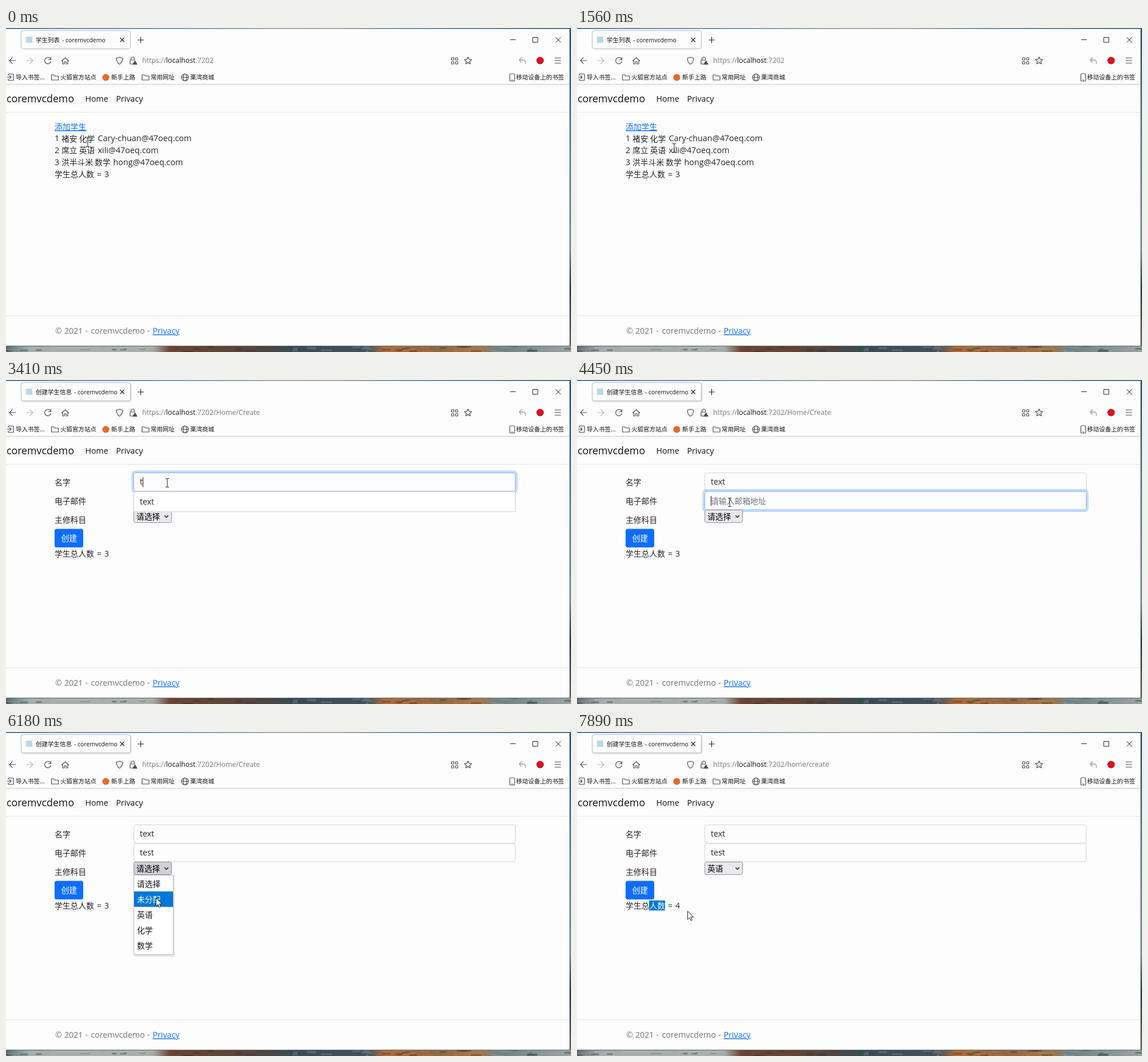
Recreate the animation shown at these times as an HTML page. Size 988 by 567 pixels, loop 8000 ms.

```html
<!DOCTYPE html>
<html lang="zh-CN">
<head>
<meta charset="utf-8">
<title>coremvcdemo</title>
<style>
  html, body { margin: 0; width: 100%; height: 100%; overflow: hidden; background: #34424f; }
  svg { display: block; width: 988px; height: 567px; }
  text { font: 14.2px "Open Sans", "Noto Sans", sans-serif; white-space: pre; }
  .cn { font: 13.8px "Noto Sans CJK SC", "Noto Sans CJK", sans-serif; }
  .small { font-size: 10.5px; }
  .url { font-size: 12.3px; }
  .nav { fill: #111; }
  .brand { font-size: 17.8px; }
  .mail { font-size: 14.4px; }
  .link { fill: #0d6efd; text-decoration: underline; }
  .link.hover { fill: #0a58ca; }
  .icon { fill: none; stroke: #4d4d55; stroke-width: 1.2; stroke-linecap: round; stroke-linejoin: round; }
  .pale { stroke: #b5b5ba; }
  .field { fill: #fdfdfd; stroke: #ced4da; }
  .field.focus { stroke: #86b7fe; }
  .ring { fill: none; stroke: #0d6efd; stroke-width: 3.5; }
  .hint { fill: #6c757d; }
</style>
</head>
<body>
<svg viewBox="0 0 988 567" fill="#212529">
  <defs>
    <linearGradient id="ground">
      <stop offset="0" stop-color="#59676c"/><stop offset=".04" stop-color="#a3b0ae"/>
      <stop offset=".26" stop-color="#a9b1aa"/><stop offset=".29" stop-color="#6b4431"/>
      <stop offset=".42" stop-color="#5a4638"/><stop offset=".5" stop-color="#3a4a55"/>
      <stop offset=".64" stop-color="#43525c"/><stop offset=".67" stop-color="#b06a35"/>
      <stop offset=".76" stop-color="#8f6542"/><stop offset=".84" stop-color="#a8774a"/>
      <stop offset=".87" stop-color="#6f7f82"/><stop offset="1" stop-color="#98a4a2"/>
    </linearGradient>
    <linearGradient id="sky">
      <stop offset="0" stop-color="#1d4f7c"/><stop offset=".3" stop-color="#4f7f9c"/>
      <stop offset=".55" stop-color="#8a9490"/><stop offset=".75" stop-color="#386a8c"/>
      <stop offset="1" stop-color="#1c4468"/>
    </linearGradient>
    <linearGradient id="side" x2="0" y2="1">
      <stop offset="0" stop-color="#1f4d75"/><stop offset=".35" stop-color="#55809c"/>
      <stop offset=".7" stop-color="#7c8c92"/><stop offset=".82" stop-color="#22303a"/>
      <stop offset="1" stop-color="#6c675e"/>
    </linearGradient>
    <linearGradient id="glow">
      <stop offset=".85" stop-color="#cbe6ff"/><stop offset="1" stop-color="#e2f1ff"/>
    </linearGradient>
    <clipPath id="selClip"><path id="selShape"/></clipPath>
    <path id="folder" d="M-6-4.5h4l1.5 2h6.5v7h-12z"/>
  </defs>

  <rect y="555" width="988" height="12" fill="url(#ground)"/>
  <g id="strokes"></g>
  <rect width="988" height="2" fill="url(#sky)"/>
  <rect x="984" width="4" height="557" fill="url(#side)"/>
  <rect y="1.500" width="986" height="554.500" fill="#fdfdfd"/>
  <path d="M0 556.500H986" stroke="#59636b"/>
  <path d="M985.500 2V556" stroke="#8a98a3"/>

  <!-- tab strip -->
  <rect id="shadow" x="26" y="5" width="194" height="34" rx="5" fill="#00000018"/>
  <rect x="26.5" y="4.5" width="191" height="32" rx="4" fill="#fdfdfd" stroke="#b4b4ba"/>
  <rect id="burst" x="27" y="5" height="31" rx="3.5" fill="url(#glow)"/>
  <rect x="35" y="15" width="11" height="11" fill="#b9d8ec"/>
  <g fill="#15141a">
    <text id="title" class="cn small" x="52" y="25"></text>
    <text id="titleEnd" class="small" y="25">- coremvcdemo</text>
  </g>
  <g class="icon" style="stroke:#222">
    <path d="M200 17.5l6.5 6.5m0-6.5l-6.5 6.5M230.500 21h10m-5-5v10"/>
    <path d="M882 20.500h9M921.500 16.500h8.500v8.500h-8.500zM961.500 16.500l8.500 8.500m0-8.500l-8.500 8.500" stroke-width="1"/>
  </g>

  <!-- toolbar -->
  <g class="icon">
    <path d="M17 57H6m5-5l-5 5 5 5"/>
    <path class="pale" d="M36 57h11m-5-5l5 5-5 5"/>
    <path d="M78 54.500a5.500 5.500 0 1 0 .5 4M78.500 51.500v4h-4"/>
    <path d="M97.500 57.500l6-5.500 6 5.500M99 56.500v6.500h3v-4h3v4h3v-6.500"/>
    <path d="M198.500 51l5.500 2c0 5-1.500 8-5.500 10.500-4-2.500-5.500-5.500-5.500-10.500z"/>
    <path d="M218.500 56v-2a3 3 0 0 1 6 0v2M222 63h-5v-7h8"/>
    <path d="M225.500 57.500l3.500 6h-7z" fill="#4d4d55"/>
    <path d="M808 50.800l1.900 4.100 4.500.5-3.300 3 .9 4.400-4-2.200-4 2.200.9-4.400-3.300-3 4.500-.5z"/>
    <path class="pale" d="M901 52l-3.500 4 3.500 4m-3.500-4h6q5 0 5 6" stroke-width="2"/>
    <path d="M960 52.500h10m-10 4.500h10m-10 4.500h10"/>
    <path d="M779 52h4v4h-4zM786 52h4v4h-4zM779 59h4v4h-4zM786 59h4v4h-4z"/>
  </g>
  <circle cx="934" cy="57" r="6.500" fill="#d9121f"/>
  <g fill="#7b7b80">
    <text class="url" x="238" y="61">https://<tspan fill="#15141a">localhost</tspan>:7202<tspan id="path"></tspan></text>
  </g>

  <!-- bookmarks -->
  <g class="icon">
    <path d="M4 83v-2.500h9v11h-9v-2.500M2 86h7m-2.500-2.500l2.500 2.500-2.500 2.500"/>
    <use href="#folder" x="85.500" y="86.500"/><use href="#folder" x="244" y="86.500"/>
    <circle cx="313" cy="86.500" r="6"/>
    <ellipse cx="313" cy="86.500" rx="2.700" ry="6"/><path d="M307 86.500h12"/>
    <rect x="881" y="80" width="8.500" height="13" rx="1.500"/><path d="M884 91h2.500"/>
  </g>
  <circle cx="174.500" cy="86.500" r="6" fill="#f0672a"/>
  <g fill="#15141a">
    <text class="cn small" x="17" y="90">导入书签...</text>
    <text class="cn small" x="95" y="90">火狐官方站点</text>
    <text class="cn small" x="184" y="90">新手上路</text>
    <text class="cn small" x="253" y="90">常用网址</text>
    <text class="cn small" x="322" y="90">栗湾商城</text>
    <text class="cn small" x="892" y="90">移动设备上的书签</text>
  </g>
  <path d="M0 98.500H985" stroke="#c9c9cd"/>

  <!-- page frame -->
  <text class="nav brand" x="1" y="130">coremvcdemo</text>
  <text class="nav" x="138.500" y="128.500">Home</text>
  <text class="nav" x="192.500" y="128.500">Privacy</text>
  <path d="M0 147.500H985M0 503.500H985" stroke="#dee2e6"/>
  <g class="hint">
    <text x="86" y="535">©</text><text x="102" y="535">2021</text><text x="138.500" y="535">-</text>
    <text x="148.500" y="535">coremvcdemo</text><text x="247" y="535">-</text>
  </g>
  <text class="link" x="256.500" y="535">Privacy</text>

  <!-- student list -->
  <g id="list">
    <text id="add" class="cn link" x="85" y="178">添加学生</text>
    <g id="rows">
      <text x="85" y="198">1</text><text class="cn" x="97" y="198.500">褚安 化学</text>
      <text class="mail" x="160.500" y="198">Cary-chuan@47oeq.com</text>
      <text x="85" y="219">2</text><text class="cn" x="97" y="219">席立 英语</text>
      <text class="mail" x="160.500" y="219">xili@47oeq.com</text>
      <text x="85" y="239.500">3</text><text class="cn" x="97" y="240">洪半斗米 数学</text>
      <text class="mail" x="187.500" y="239.500">hong@47oeq.com</text>
    </g>
  </g>
  <g id="total">
    <text class="cn" x="85" y="260.500">学生总人数</text>
    <text x="159" y="260.500">=</text><text id="count" x="172" y="260.500"></text>
  </g>

  <!-- create form -->
  <g id="form">
    <text class="cn" x="85" y="184">名字</text>
    <text class="cn" x="85" y="216.500">电子邮件</text>
    <text class="cn" x="85" y="249.500">主修科目</text>
    <g id="name"></g>
    <g id="mail"></g>
    <rect id="select" x="223.500" y="227.500" width="66" height="22" rx="3" stroke="#8f8f9d"/>
    <text id="choice" class="cn" x="228" y="244" fill="#000"></text>
    <path class="icon" d="M277.500 237.500l3 3 3-3" style="stroke:#111"/>
    <rect id="button" x="85" y="260.500" width="50" height="32.500" rx="3.500"/>
    <text class="cn" x="96.500" y="282" fill="#fff">创建</text>
    <g id="popup">
      <rect x="223.500" width="667" height="35" fill="#fff" stroke="#cfcfd8"/>
      <text id="past" x="234" y="22"></text>
    </g>
    <g id="menu"></g>
  </g>

  <use href="#selShape" fill="#0078d7"/>
  <g clip-path="url(#selClip)" fill="#fff"><use id="selText"/></g>

  <g id="status">
    <path d="M0 539.500H176q3 0 3 3V556H0z" fill="#f6f6f8" stroke="#cfcfd8"/>
    <text id="statusText" class="small" y="551" fill="#4a4a52"></text>
  </g>

  <g id="cursor">
    <path id="arrow" d="M.5.500v14.500l3.300-3.200 2.400 5.200 2.300-1-2.400-5.200h4.600z" fill="#fff" stroke="#222"/>
    <path id="beam" d="M-3-7.500h2q1 0 1 1 0-1 1-1h2M0-6.500v13M-3 7.500h2q1 0 1-1 0 1 1 1h2" fill="none" stroke="#222"/>
    <path id="hand" d="M-1.500 7V1.500a1.500 1.500 0 0 1 3 0V6l6 1.500q1.500.5 1.500 2V13l-1.500 4h-7L-5 10.500q0-2 2-1l1.500 1.500z" fill="#fff" stroke="#222"/>
  </g>
</svg>
<script>
const LOOP = 8000;
const $ = id => document.getElementById(id);
const set = (id, attrs) => { for (const k in attrs) $(id).setAttribute(k, attrs[k]); };
const show = (id, on) => { $(id).style.display = on ? '' : 'none'; };

// time, shape, x, y
const moves = [
  [0, 'beam', 143, 200], [120, 'beam', 135, 186], [260, 'hand', 112, 176], [380, 'hand', 92, 179],
  [530, 'beam', 140, 193], [650, 'beam', 160, 214], [770, 'beam', 190, 234], [890, 'arrow', 252, 247],
  [1010, 'arrow', 256, 260], [1130, 'arrow', 257, 268], [1440, 'arrow', 230, 250], [1560, 'beam', 170, 210],
  [1680, 'hand', 122, 174], [1950, 'arrow', 190, 215], [2100, 'arrow', 343, 311], [2220, 'arrow', 355, 302],
  [2340, 'arrow', 343, 266], [2460, 'arrow', 322, 232], [2610, 'beam', 296, 202], [2760, 'beam', 284, 186],
  [2880, 'beam', 282, 180], [3800, 'beam', 280, 182], [3920, 'beam', 276, 190], [4040, 'beam', 271, 201],
  [4190, 'beam', 267, 214], [4850, 'beam', 250, 222], [4970, 'arrow', 190, 262], [5100, 'arrow', 151, 271],
  [5250, 'arrow', 154, 262], [5370, 'arrow', 162, 245], [5490, 'arrow', 176, 240], [5640, 'arrow', 222, 238],
  [5760, 'arrow', 245, 240], [5880, 'arrow', 255, 246], [6030, 'arrow', 264, 278], [6180, 'arrow', 262, 290],
  [6300, 'arrow', 259, 312], [6420, 'arrow', 258, 318], [6810, 'arrow', 153, 286], [6960, 'arrow', 139, 284],
  [7110, 'hand', 122, 278], [7470, 'arrow', 126, 284], [7590, 'arrow', 140, 292],
  [7740, 'arrow', 174, 298], [7890, 'arrow', 193, 313]
];

const rowSel = (...widths) => widths.map((w, i) => [85, 184.3 + i * 20.7, w]);
const LINK = 'https://localhost:7202/Home/Create';

const steps = [
  [0, { page: 'list', path: '', hover: 0, sel: [], status: 0, note: LINK, burst: [0, 0], shadow: 0, name: '', mail: '',
        focus: '', ring: .25, popup: 0, choice: '请选择', shade: '#e9e9ed', menu: -1, button: '#0d6efd', count: 3 }],
  [260, { hover: 1 }],
  [530, { hover: 0, status: 1, sel: rowSel(56) }],
  [650, { status: .8, sel: rowSel(244, 76) }],
  [770, { status: .45, sel: rowSel(244, 184, 104) }],
  [890, { status: .1, sel: rowSel(244, 184, 139) }],
  [1010, { status: 0 }],
  [1440, { sel: [] }],
  [1680, { hover: 1 }],
  [1830, { status: 1 }],
  [1950, { page: 'form', path: '/Home/Create', hover: 0 }],
  [2100, { status: 0, shadow: 1, burst: [112, 1] }],
  [2220, { burst: [190, .6] }],
  [2340, { burst: [190, .25] }],
  [2460, { burst: [0, 0] }],
  [2880, { focus: 'name', ring: .12 }],
  [3000, { ring: .25 }],
  [3410, { name: 't', popup: 1 }],
  [3530, { name: 'te' }],
  [3650, { name: 'text', popup: 0 }],
  [4330, { focus: 'mail', ring: .15 }],
  [4450, { ring: .25 }],
  [4700, { mail: 't', popup: 1 }],
  [4850, { mail: 'te' }],
  [4970, { mail: 'test', popup: 0 }],
  [5250, { focus: '', shade: '#d0d0d7' }],
  [5880, { menu: 0 }],
  [6180, { menu: 1 }],
  [6300, { menu: 2 }],
  [6540, { menu: -1, choice: '英语', shade: '#e9e9ed' }],
  [7110, { button: '#0b5ed7' }],
  [7230, { button: '#0a58ca' }],
  [7350, { status: 1, note: '正在等待 localhost…', path: '/home/create' }],
  [7470, { status: 0, count: 4, button: '#0d6efd', burst: [60, 1] }],
  [7590, { burst: [150, 1] }],
  [7740, { burst: [0, 0] }],
  [7890, { sel: [[126, 294.8, 28]] }]
];

const fields = { name: [162.5, '请输入名字'], mail: [195, '请输入邮箱地址'] };
for (const id in fields) {
  const [y, hint] = fields[id];
  $(id).innerHTML = `<rect class="ring" x="221.200" y="${y - 2.2}" width="671.600" height="36.400" rx="5"/>
    <rect class="field" x="223.500" y="${y}" width="667" height="32" rx="3.500"/>
    <text class="cn hint" x="234" y="${y + 21.5}">${hint}</text>
    <text class="value" x="234" y="${y + 20.5}"></text>
    <path class="caret" stroke="#111"/>`;
}

const options = ['请选择', '未分配', '英语', '化学', '数学'];
$('menu').innerHTML = '<rect x="224" y="251" width="71" height="142" fill="#00000018"/>' +
  '<rect x="223.500" y="250.500" width="69" height="139" fill="#fff" stroke="#b8b8c0"/>' +
  options.map((o, i) => `<rect class="row" x="224" y="${252 + i * 27}" width="68" height="27"/>
    <text class="cn" x="229" y="${271 + i * 27}">${o}</text>`).join('');

// brush marks along the lower edge
let seed = 7;
const rand = () => (seed = seed * 16807 % 2147483647) / 2147483647;
let marks = '';
for (let i = 0; i < 90; i++) {
  const x = rand() * 988;
  const tint = x > 640 && x < 840 ? '#d8853f' : x > 278 && x < 500 ? '#6e3820' : '#9aa3a3';
  marks += `<rect x="${x}" y="${556 + rand() * 9}" width="${4 + rand() * 16}" height="${1 + rand() * 2}"
    fill="${rand() < .6 ? tint : '#222f39'}" opacity=".4"/>`;
}
$('strokes').innerHTML = marks;

function drawField(id, s) {
  const box = $(id), part = c => box.querySelector(c), y = fields[id][0], on = s.focus === id;
  part('.ring').style.opacity = on ? s.ring : 0;
  part('.field').classList.toggle('focus', on);
  part('.hint').style.display = s[id] ? 'none' : '';
  part('.value').textContent = s[id];
  const x = 234.5 + (s[id] ? part('.value').getComputedTextLength() : 0);
  part('.caret').setAttribute('d', on ? `M${x} ${y + 8}v17` : '');
}

function draw(s) {
  const form = s.page === 'form';
  show('list', !form);
  show('form', form);
  $('title').textContent = form ? '创建学生信息' : '学生列表';
  set('titleEnd', { x: form ? 119 : 98 });
  $('path').textContent = s.path;
  show('shadow', s.shadow);
  set('burst', { width: s.burst[0], opacity: s.burst[1] });
  $('add').classList.toggle('hover', !!s.hover);
  set('total', { transform: `translate(0 ${form ? 48 : 0})` });
  $('count').textContent = s.count;
  set('selShape', { d: s.sel.map(([x, y, w]) => `M${x} ${y}h${w}v17.500h${-w}z`).join('') });
  set('selText', { href: form ? '#total' : '#rows' });
  set('status', { opacity: s.status });
  $('statusText').textContent = s.note;
  set('statusText', { x: s.note === LINK ? -5.5 : 4 });
  drawField('name', s);
  drawField('mail', s);
  set('select', { fill: s.shade });
  $('choice').textContent = s.choice;
  set('button', { fill: s.button });
  show('popup', s.popup);
  set('popup', { transform: `translate(0 ${s.focus === 'mail' ? 228 : 195.5})` });
  $('past').textContent = s.focus === 'mail' ? 'test' : 'text';
  show('menu', s.menu >= 0);
  document.querySelectorAll('#menu .row').forEach((r, i) => {
    r.setAttribute('fill', i === s.menu ? '#0078d7' : '#fff');
    r.nextElementSibling.setAttribute('fill', i === s.menu ? '#fff' : '#15141a');
  });
}

let last = '';
function tick() {
  const t = performance.now() % LOOP;
  const past = steps.filter(p => p[0] <= t);
  const move = moves.filter(m => m[0] <= t).pop();
  const key = past.length + ' ' + move[0];
  if (key !== last) {
    last = key;
    draw(Object.assign({}, ...past.map(p => p[1])));
    for (const shape of ['arrow', 'beam', 'hand']) show(shape, shape === move[1]);
    set('cursor', { transform: `translate(${move[2]} ${move[3]})` });
  }
  requestAnimationFrame(tick);
}
tick();
</script>
</body>
</html>
```
